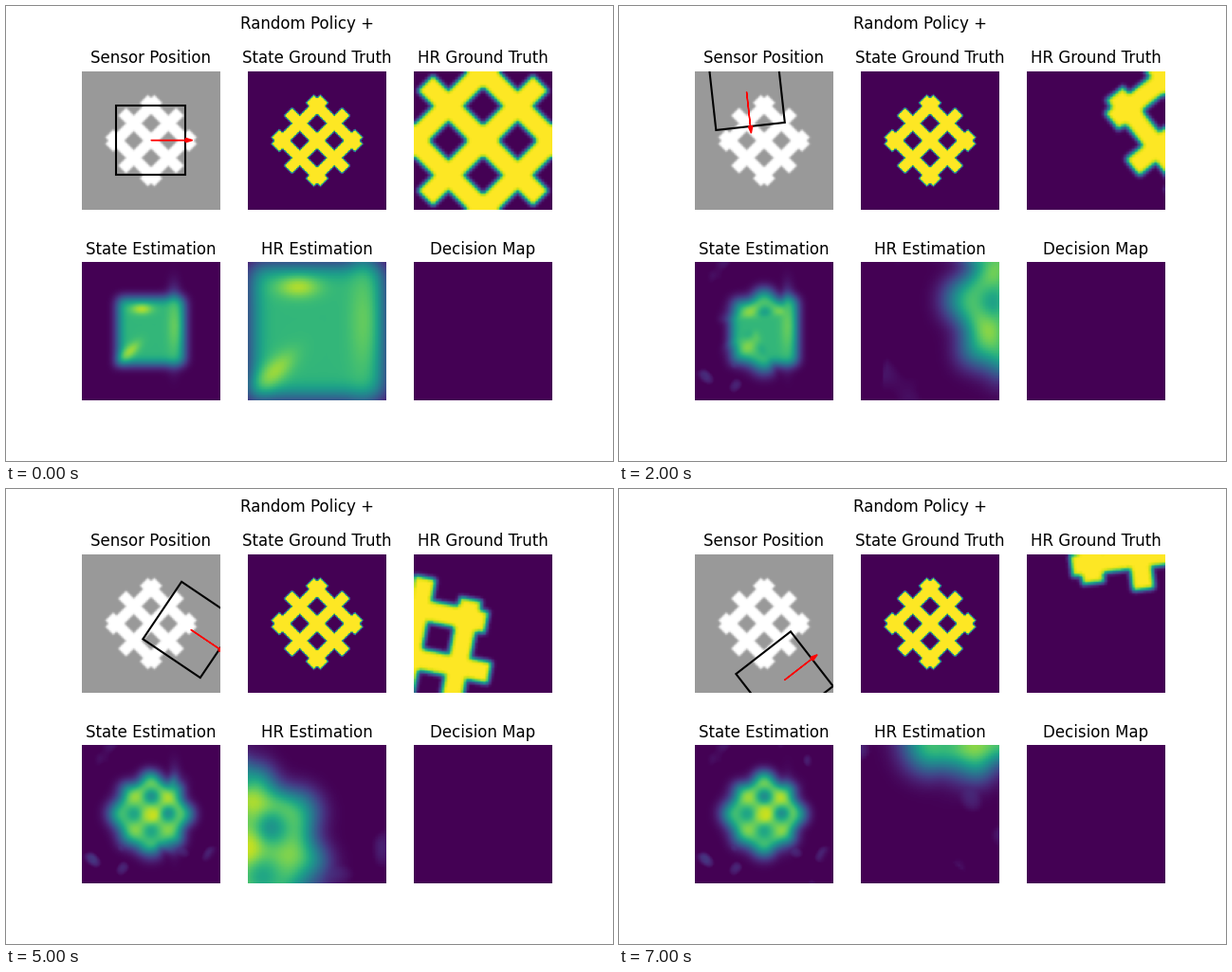
A matplotlib script that plays this animation: 640 by 480 pixels, repeating every 8 s.

```python
import numpy as np
import matplotlib.pyplot as plt
from matplotlib.animation import FuncAnimation
from matplotlib.colors import LinearSegmentedColormap

N = 100          # cells per side of the world
HALF = 25        # half side of the sensor window, in cells
PITCH = 12.5 * np.sqrt(2)
PAD = 40
TRUST = 0.75     # share of the old estimate replaced by a measurement

# Sensor pose at each step: x, y, heading in degrees (clockwise)
POSES = [(0, 0, 0), (-17.6, 33.5, 61.7), (-12.6, -34.9, 83.7),
         (-13.7, -11.2, -37), (-28, 12.6, 150), (28.8, 4.7, 34),
         (3.5, -28.5, -72), (14.8, 41.1, -37.8)]

axis = np.arange(N) - (N - 1) / 2
X, Y = np.meshgrid(axis, axis)


def frame_axes(deg):
    a = np.radians(deg)
    return np.array([np.cos(a), np.sin(a)]), np.array([-np.sin(a), np.cos(a)])


def to_local(x, y, deg):
    d, p = frame_axes(deg)
    dx, dy = X - x, Y - y
    return dx * d[0] + dy * d[1], dx * p[0] + dy * p[1]


def lattice():
    u, v = to_local(0, 0, 45)
    img = np.zeros((N, N))
    for offset, reach in ((-PITCH, 25), (0, 29.5), (PITCH, 25)):
        for along, across in ((u, v), (v, u)):
            gap = np.maximum(np.abs(across - offset) - 4, np.abs(along) - reach)
            img = np.maximum(img, np.clip(0.5 - gap, 0, 1))
    return img


def blur(img, sigma):
    k = np.exp(-((axis[:, None] - axis) / sigma) ** 2 / 2)
    k /= k.sum(1, keepdims=True)
    return k @ img @ k.T


def bump(img, x, y, rx, ry, tilt, value):
    """Pull the image towards a value inside a soft ellipse."""
    u, v = to_local(x, y, tilt)
    return img + (value - img) * np.exp(-((u / rx) ** 2 + (v / ry) ** 2) / 2)


def window(pose):
    u, v = to_local(*pose)
    soft = lambda t: 1 / (1 + np.exp(-(HALF - np.abs(t)) / 1.3))
    return soft(u) * soft(v)


def zoom(img, pose):
    """Bilinear view of the world as seen in the sensor window."""
    x, y, deg = pose
    d, p = frame_axes(deg)
    s = np.arange(50) - 24.5
    a, b = np.meshgrid(s, s)
    col = x + a * d[0] + b * p[0] + (N - 1) / 2 + PAD
    row = y + a * d[1] + b * p[1] + (N - 1) / 2 + PAD
    big = np.pad(img, PAD)
    c, r = np.floor(col).astype(int), np.floor(row).astype(int)
    fc, fr = col - c, row - r
    top = big[r, c] * (1 - fc) + big[r, c + 1] * fc
    low = big[r + 1, c] * (1 - fc) + big[r + 1, c + 1] * fc
    return top * (1 - fr) + low * fr


def measured(truth):
    """What the sensor makes of the world: blurred, sharper to the upper right."""
    sharp = 1 / (1 + np.exp((Y - X) / 10))
    coarse, fine = blur(truth, 5.5), blur(truth, 4.1)
    img = (coarse + (fine - coarse) * sharp) * 1.06
    img = img * np.exp(-(np.hypot(X, Y) / 37) ** 4)
    img = bump(img, 0, 0, 3.5, 3.5, 0, 0.97)
    noise = blur(np.random.default_rng(4).standard_normal((N, N)), 4)
    haze = np.clip((noise / noise.std() - 1) * 0.13, 0, 0.17)
    return np.maximum(img, haze)


def first_guess():
    block = (np.maximum(np.abs(X), np.abs(Y)) < 24.5) * 0.66
    img = blur(block, 3.6)
    img = bump(img, 16.5, -3.6, 3.5, 14, 0, 0.76)
    img = bump(img, -6.8, -15.9, 5.5, 2.8, 0, 0.88)
    return bump(img, -15, 14.3, 6.5, 3, -45, 0.85)


truth = lattice()
seen = measured(truth)
estimates = [first_guess()]
for pose in POSES[1:]:
    old = estimates[-1]
    estimates.append(old + (seen - old) * window(pose) * TRUST)

fig, axs = plt.subplots(2, 3, figsize=(6.4, 4.8), dpi=100)
fig.text(247.2 / 640, 0.98, "Random Policy +", fontsize=12, ha="left", va="top")

pale = LinearSegmentedColormap.from_list("pale", ["#999999", "#ffffff"])


def panel(ax, title, img, cmap="viridis"):
    ax.set_title(title, fontsize=12)
    ax.axis("off")
    im = ax.imshow(img, cmap=cmap, vmin=0, vmax=1, extent=(-50, 50, 50, -50))
    ax.set_autoscale_on(False)
    return im


sensor = axs[0, 0]
truth_soft = blur(truth, 0.6)
panel(sensor, "Sensor Position", truth_soft, pale)
panel(axs[0, 1], "State Ground Truth", truth)
hr_truth = panel(axs[0, 2], "HR Ground Truth", zoom(truth_soft, POSES[0]))
state = panel(axs[1, 0], "State Estimation", estimates[0])
hr_state = panel(axs[1, 1], "HR Estimation", zoom(estimates[0], POSES[0]))
panel(axs[1, 2], "Decision Map", np.zeros((N, N)))

box = plt.Polygon(np.zeros((4, 2)), fill=False, ec="black", lw=1.5)
sensor.add_patch(box)
arrow = sensor.arrow(0, 0, HALF, 0, head_width=3, head_length=5, color="red")
sensor.set(xlim=(-50, 50), ylim=(50, -50))


def update(i):
    pose = POSES[i]
    d, p = frame_axes(pose[2])
    centre = np.array(pose[:2])
    corners = ((-1, -1), (1, -1), (1, 1), (-1, 1))
    box.set_xy([centre + HALF * (a * d + b * p) for a, b in corners])
    arrow.set_data(x=pose[0], y=pose[1], dx=HALF * d[0], dy=HALF * d[1])
    hr_truth.set_data(zoom(truth_soft, pose))
    state.set_data(estimates[i])
    hr_state.set_data(zoom(estimates[i], pose))
    return box, arrow, hr_truth, state, hr_state


anim = FuncAnimation(fig, update, frames=len(POSES), interval=1000, repeat=True)
plt.show()
```
